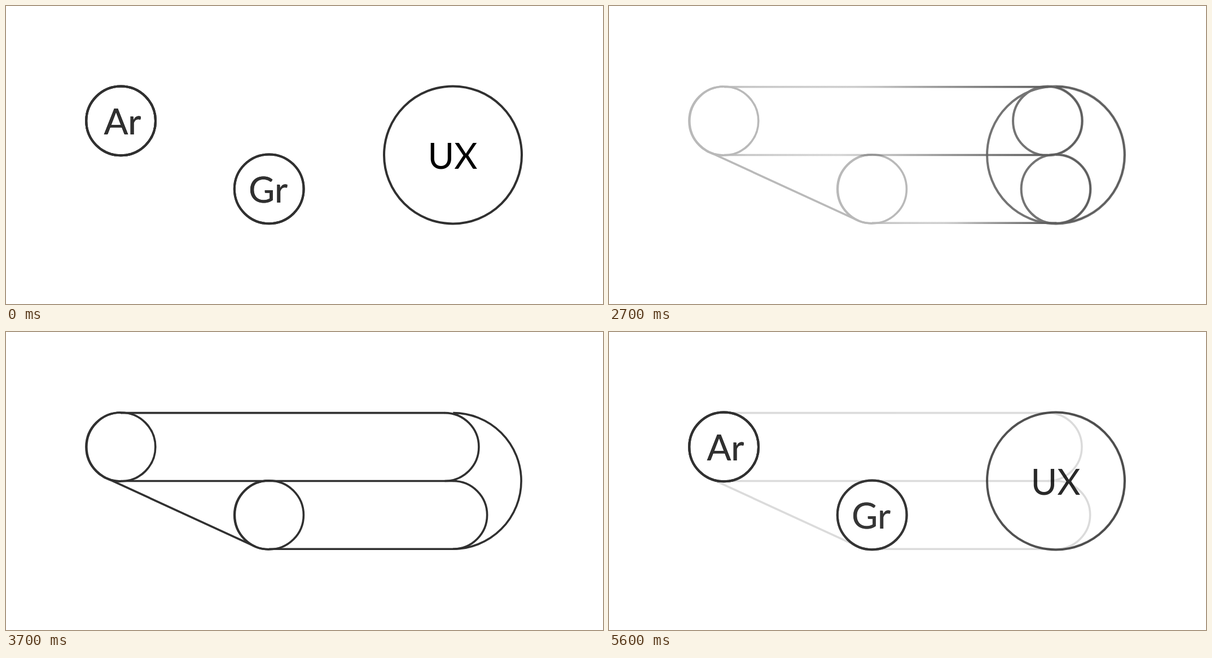
These frames come from a looping animation (1058 by 529 pixels, 5700 ms). An HTML page:

```html
<!DOCTYPE html>
<html lang="en">
<head>
<meta charset="utf-8">
<title>Circles to capsules</title>
<style>
  html, body { margin: 0; height: 100%; overflow: hidden; background: #fff; }
  svg { display: block; width: 100vw; height: 100vh; }
  circle, path { fill: none; stroke: #303030; stroke-width: 3.6; }
  .bold circle { stroke-width: 4; }
  text { font: 63.5px Lato, sans-serif; fill: #303030; }
</style>
</head>
<body>
<svg viewBox="0 0 1058 529">
  <defs>
    <linearGradient id="rise">
      <stop stop-color="#303030" stop-opacity="0"/><stop offset="1" stop-color="#303030"/>
    </linearGradient>
    <linearGradient id="fall">
      <stop stop-color="#303030"/><stop offset="1" stop-color="#303030" stop-opacity="0"/>
    </linearGradient>
  </defs>
</svg>
<script>
const svg = document.querySelector('svg');
const TOP = 143.6, MID = 264.5, LOW = 385.2;

const circle = (x, y, r) => `<circle cx="${x}" cy="${y}" r="${r}"/>`;
const path = d => `<path d="${d}"/>`;
const label = (x, y, s, color = '#303030') => `<text x="${x}" y="${y}" style="fill:${color}">${s}</text>`;
const fade = (kind, x1, x2, y) =>
  `<rect x="${x1}" y="${y - 1.8}" width="${x2 - x1}" height="3.6" fill="url(#${kind})"/>`;
const halfRight = (x, y1, y2) => path(`M${x} ${y1}A1 1 0 0 1 ${x} ${y2}`);
const halfLeft = (x, y1, y2) => path(`M${x} ${y1}A1 1 0 0 0 ${x} ${y2}`);
const line = (x1, y1, x2, y2) => path(`M${x1} ${y1}L${x2} ${y2}`);

const ar = circle(203.6, 203.9, 61.4) + label(173.5, 228, 'Ar');
const gr = circle(466.2, 324.8, 61.4) + label(430, 349, 'Gr');
const ux = circle(792, 264.4, 122) + label(747.5, 288.5, 'UX', '#000');

const shell = circle(203.8, 204, 61) + circle(466.4, 324.9, 61)
  + halfLeft(203, TOP - .6, MID + .6) + halfLeft(465.6, MID - .6, LOW + .6)
  + line(178, 259.4, 440.6, 380.4)
  + halfRight(777.5, TOP, MID) + halfRight(792.3, MID, LOW) + halfRight(792.3, TOP, LOW);

const gradientCircles = circle(792, 264.4, 122) + circle(777.4, 203.9, 61.4) + circle(792, 324.8, 61.4)
  + fade('rise', 240, 778, TOP) + fade('rise', 245, 778, MID) + fade('rise', 490, 793, LOW);

const brokenCapsules = shell
  + fade('fall', 204, 435, TOP) + fade('rise', 475, 778, TOP)
  + fade('fall', 204, 410, MID) + fade('rise', 490, 778, MID)
  + fade('fall', 466, 595, LOW) + fade('rise', 615, 793, LOW);

const capsules = shell
  + line(203, TOP, 778, TOP) + line(203, MID, 793, MID) + line(466, LOW, 793, LOW);

function addLayer(content, bold) {
  const g = document.createElementNS('http://www.w3.org/2000/svg', 'g');
  if (bold) g.setAttribute('class', 'bold');
  g.innerHTML = content;
  svg.append(g);
  return g;
}

// The small labelled circles are stacked copies, so they fade more slowly than the big one.
const scenes = [
  [addLayer(capsules)],
  [addLayer(brokenCapsules)],
  [addLayer(gradientCircles, true)],
  [ar, ar, ar, gr, gr, ux].map(part => addLayer(part, true)),
].reverse();

// Crossfades advance in sixths, one step every 100 ms.
const progress = (t, start) => Math.max(0, Math.min(6, Math.floor((t - start) / 100) + 1)) / 6;

function draw(now) {
  const t = now % 5700;
  const [a, b, c, d] = [2000, 2600, 3200, 5200].map(start => progress(t, start));
  [1 - a + d, a - b, b - c, c - d].forEach((opacity, i) => {
    for (const layer of scenes[i]) layer.style.opacity = opacity;
  });
}

let begin;
function tick(now) {
  begin ??= now;
  draw(now - begin);
  requestAnimationFrame(tick);
}
draw(0);
requestAnimationFrame(tick);
</script>
</body>
</html>
```
